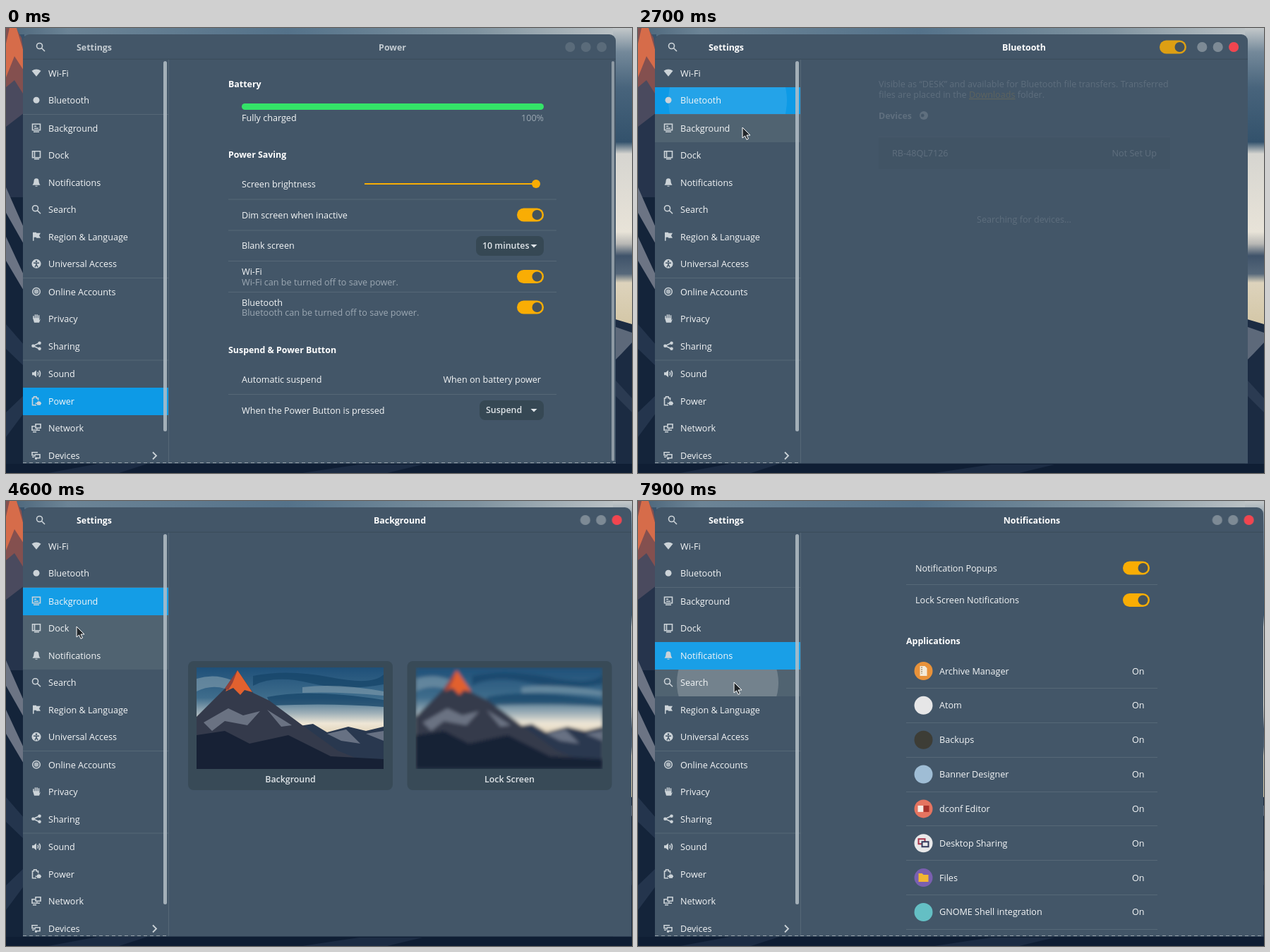
Animation, 887 px wide and 631 px high, one loop 8000 ms. Source, as an HTML page:

```html
<!DOCTYPE html>
<html lang="en">
<head>
<meta charset="utf-8">
<title>Settings</title>
<style>
html, body { margin: 0; width: 100%; height: 100%; overflow: hidden; background: #14243a; }
svg.stage { display: block; width: 100vw; height: 100vh; }
text { font: 400 12.6px "Open Sans", "Noto Sans", sans-serif; fill: #f4f6f7; white-space: pre; }
.bold { font-weight: 700; font-size: 12.4px; fill: #fff; }
.semi { font-weight: 600; font-size: 12.4px; fill: #dfe4e8; }
.muted { fill: #9ca8b3; }
.small { font-size: 11.2px; }
.dim { fill: #c3cbd1; }
.end { text-anchor: end; }
.mid { text-anchor: middle; }
.line { stroke: #566877; }
.dash { stroke: #98a3ac; stroke-dasharray: 5 4; }
.stroke { fill: none; stroke: #ccd3d8; stroke-width: 1.6; }
.solid { fill: #ccd3d8; }
.hidden { opacity: 0; }
</style>
</head>
<body>
<svg class="stage" viewBox="0 0 887 631" preserveAspectRatio="none"></svg>
<script>
const LOOP = 8000, BG = '#435668', DARK = '#364854', YELLOW = '#f9ad04';

// Drawing helpers: y is the vertical centre of a line of text.
const text = (x, y, s, cls = '') => `<text x="${x}" y="${y + 4.5}" class="${cls}">${s}</text>`;
const rect = (x, y, w, h, fill, r = 0, more = '') =>
  `<rect x="${x}" y="${y}" width="${w}" height="${h}" rx="${r}" fill="${fill}" ${more}/>`;
const dot = (x, y, r, fill, more = '') => `<circle cx="${x}" cy="${y}" r="${r}" fill="${fill}" ${more}/>`;
const path = (d, fill, more = '') => `<path d="${d}" fill="${fill}" ${more}/>`;
const hline = (x1, x2, y, cls = 'line') => `<path d="M${x1} ${y}H${x2}" class="${cls}"/>`;
const at = (x, y, body) => `<g transform="translate(${x} ${y})">${body}</g>`;
const group = (id, body, cls = '') => `<g id="${id}" class="${cls}">${body}</g>`;
const each = (list, fn) => list.map(fn).join('');
const toggle = (x, y, on = true) => rect(x, y - 9.5, 38, 19, on ? YELLOW : '#637280', 9.5)
  + dot(on ? x + 28.5 : x + 9.5, y, 7, on ? '#44525c' : DARK);
const dropdown = (x, right, y, label) => rect(x, y - 14, right - x, 28, DARK, 8)
  + text(x + 9, y - .5, label, 'semi') + path(`M${right - 18.5} ${y - 2}h9l-4.5 4.5z`, '#dfe4e8');
const icon = (s, f = '') => `<path d="${s}" class="stroke"/><path d="${f}" class="solid"/>`;
const grad = (id, stops, dir = 'x2="0" y2="1"') => `<linearGradient id="${id}" ${dir}>`
  + each(stops, ([o, c]) => `<stop offset="${o}" stop-color="${c}"/>`) + '</linearGradient>';

const searchIcon = icon('M2.5-1.5A4 4 0 1 1-5.5-1.5A4 4 0 1 1 2.5-1.5M1.5 1.5L6 6');
const rows = [
  ['Wi-Fi', icon('', 'M-6.5-3Q0-7.5 6.5-3L0 5Z')],
  ['Bluetooth', dot(0, 0, 4.5, '#ccd3d8')],
  ['Background', icon('M-5.5-5.5H5.5V3H-5.5ZM-4 5.5H4M-3 .5H3M-3-2.5H0')],
  ['Dock', icon('M-5.5-5.5H5.5V3.5H-5.5ZM-2.5-5.5V3.5M-3 5.5H4')],
  ['Notifications', icon('', 'M-5.5 4Q-3.5 2-3.5-1.5Q-3.5-5.5 0-5.5T3.5-1.5Q3.5 2 5.5 4ZM-1.5 5H1.5V6H-1.5Z')],
  ['Search', searchIcon],
  ['Region &amp; Language', icon('', 'M-5-6H0V-5H6L4-1.5 6 2H0V1H-3.5V6H-5Z')],
  ['Universal Access', dot(0, 0, 6.5, '#ccd3d8') + dot(0, -3.5, 1.3, BG)
    + path('M-4-1H4M0-1V2M-2 5L0 1 2 5', 'none', `stroke="${BG}" stroke-width="1.5"`)],
  ['Online Accounts', dot(0, 0, 5.3, 'none', 'stroke="#ccd3d8" stroke-width="1.5"') + dot(0, 0, 3.3, '#aab4bc')],
  ['Privacy', icon('M-4 0V-4M-1.5 0V-6M1 0V-6M3.5 0V-5', 'M-5-1H4.3V2L6 0 4 5.5H-3Z')],
  ['Sharing', icon('M5-4.5L-4.5 0 5 4.5') + dot(4.5, -4, 2.3, '#ccd3d8') + dot(-4.5, 0, 2.3, '#ccd3d8') + dot(4.5, 4, 2.3, '#ccd3d8')],
  ['Sound', icon('M2-2.5Q3.5 0 2 2.5M4-4.5Q7 0 4 4.5', 'M-6-2H-3.5L0-5V5L-3.5 2H-6Z')],
  ['Power', icon('M0 6H-5.5V-4H-3.5V-6H0V-4H2.5V-1M-1.5 3.5H1', 'M1 1H3V0H4V1H6V2.5H7V4.5H6V6H1Z')],
  ['Network', icon('M-1-5.5H6V0H-1ZM-2-2.5H-6V3H1V1M-5 5.5H0M2 3H5')],
  ['Devices', icon('M2-4H-6V0H-3M-2-1H5V4H1M-2-1V2M-6 2.5H-3', 'M-2 3H1V6H-2Z')]
];
const rowTop = i => 45 + 38.5 * i + (i >= 2) + (i >= 8) + (i >= 11);

const sidebar = each(rows, ([label, mark], i) => {
  const top = rowTop(i), mid = top + 19.25;
  return `<svg x="24" y="${top}" width="206" height="38.5">`
    + rect(0, 0, 206, 39, '#7e9490', 0, `id="hover${i}" class="hidden" fill-opacity=".22"`)
    + rect(0, 0, 206, 39, '#0d9ae6', 0, `id="pick${i}" class="hidden"`)
    + dot(103, 19.25, 0, '#fff', `id="ripple${i}" class="hidden"`) + '</svg>'
    + at(43, mid - .5, mark) + text(60, mid, label);
}) + each([2, 8, 11], i => hline(24, 230, rowTop(i) - .5))
  + path('M208 601.5l5 5-5 5', 'none', 'stroke="#ccd3d8" stroke-width="1.8"')
  + path('M230.5 45V617', 'none', 'class="line"') + hline(24, 230, 616.5, 'dash')
  + rect(223, 47, 5, 525, '#b4bfc7', 2.5, 'id="scrollbar" fill-opacity=".85"');

const pageDash = right => hline(230, right, 616.5, 'dash');

const power = text(315, 79.5, 'Battery', 'bold') + rect(334, 107, 428, 9, '#34e468', 4.5)
  + text(334, 127, 'Fully charged') + text(762, 127, '100%', 'muted end')
  + text(315, 179, 'Power Saving', 'bold') + text(334, 221, 'Screen brightness')
  + rect(508, 220, 243, 2, YELLOW) + dot(751, 221, 6, YELLOW)
  + text(334, 265, 'Dim screen when inactive') + toggle(724, 265)
  + text(334, 308.5, 'Blank screen') + dropdown(666, 762, 309, '10 minutes')
  + each([['Wi-Fi', 345.5], ['Bluetooth', 389]], ([name, y]) => text(334, y, name)
    + text(334, y + 14.5, name + ' can be turned off to save power.', 'muted') + toggle(724, y + 7))
  + text(315, 456, 'Suspend &amp; Power Button', 'bold')
  + text(334, 498, 'Automatic suspend') + text(758, 498, 'When on battery power', 'end')
  + text(334, 542, 'When the Power Button is pressed') + dropdown(671, 762, 542, 'Suspend')
  + each([243, 287, 330.5, 374.5, 519.5], y => hline(315, 780, y))
  + rect(858, 47, 4, 567, '#8e9aa4', 2) + pageDash(864);

const gear = dot(0, 0, 14, DARK) + dot(0, 0, 3.6, 'none', 'stroke="#dfe4e8" stroke-width="2.8"')
  + dot(0, 0, 5.4, 'none', 'stroke="#dfe4e8" stroke-width="2" stroke-dasharray="2.12"');
const lock = rect(-5, -1, 10, 7, '#f4f6f7', 1) + path('M-3-1V-3A3 3 0 0 1 3-3V-1', 'none', 'stroke="#f4f6f7" stroke-width="1.6"');
const signal = path('M-6.5-2.5Q0-7.5 6.5-2.5L0 5Z', '#8a98a4') + path('M-5-1Q0-4.5 5-1L0 5Z', '#f4f6f7');
const networks = ['REDNOR_2G_K4bT', 'LUMOVARE_3AF7', 'SillyMoonPatio', 'Piso', 'wifi piso.', 'WLAN_6B2D',
  'Piso5', 'REDNOR_5G_K4bT', 'LUMOVARE_MAXI_4837', 'WLAN5QR_D7C1', 'LUMOVARE_BE92'];
const wifi = text(360, 92.5, 'Airplane Mode', 'bold')
  + text(360, 108.5, 'Disables Wi-Fi, Bluetooth and mobile broadband', 'muted small') + toggle(698, 99, false)
  + text(342, 163, 'Visible Networks', 'bold')
  + each(networks, (name, i) => {
    const y = 200.5 + 39.4 * i;
    return text(355, y, name) + (i % 3 || i > 6 ? '' : at(681, y - .5, gear))
      + at(715, y - 1, lock) + at(734, y, signal) + hline(343, 753, Math.round(y + 19) + .5);
  }) + path('M402.5 437l3 3 6-6.5', 'none', 'stroke="#fff" stroke-width="2.4"') + pageDash(864);

const device = (y, name, state, cls = '') => text(360, y, name, cls) + text(735, y, state, cls + ' end');
const devices = [['IoT', 'Disconnected'], ['K-T-2014-09-17', 'Not Set Up'], ['RB-48QL7126', 'Not Set Up'], ['Unknown', 'Not Set Up', 'muted']];
const bluetooth = text(341, 79.5, 'Visible as “DESK” and available for Bluetooth file transfers. Transferred')
  + text(341, 94.5, `files are placed in the <tspan fill="#f0b030" text-decoration="underline">Downloads</tspan> folder.`)
  + text(341, 124, 'Devices', 'bold') + dot(405, 124, 6, '#fff')
  + group('spin', dot(406.3, 125.3, 2.4, BG)) 
  + group('scan', rect(341, 155, 413, 45, '#3b4b5a') + hline(341, 754, 154.5) + device(177, 'RB-48QL7126', 'Not Set Up')
    + text(547, 271, 'Searching for devices…', 'mid'))
  + each(devices, ([name, state, cls], i) => group('device' + i, device(165 + 46.4 * i, name, state, cls)
    + (i ? hline(341, 754, Math.round(142 + 46.4 * i) - .5 + (i > 1)) : ''), 'hidden'));

const mountain = rect(0, 0, 265, 144, 'url(#sky)')
  + path('M80 12Q130 2 190 14T265 10V24Q210 34 160 22T80 26ZM100 42Q160 30 265 46V56Q190 50 105 54Z', '#164468', 'opacity=".75"')
  + path('M0 16Q25 8 50 18L40 30Q20 24 0 34ZM150 28Q200 22 265 34V40Q200 34 150 36Z', '#7896a8', 'opacity=".7"')
  + path('M140 84L165 80 185 92 215 84 240 90 265 84V144H140Z', '#29384f')
  + path('M0 70L25 45 40 30 58 4 80 36 103 47 150 82 200 118 265 144H0Z', '#343a4b')
  + path('M58 4L79 35 68 32 62 39 52 29 41 34Z', '#e2612f') + path('M58 4L51 22 45 32 40 30Z', '#93413a')
  + path('M10 78L45 58 66 68 90 62 72 82 40 76 22 90ZM100 60L135 82 120 84ZM185 94L212 88 232 108 205 104ZM240 94L265 90V104Z', '#7d8494', 'opacity=".75"')
  + path('M0 96L40 90 75 108 130 96 190 126 265 130V144H0Z', '#172135');
const card = (x, label, blur) => rect(x, 227, 290, 183, '#384a57', 8)
  + `<svg x="${x + 12}" y="236" width="265" height="144"><g ${blur}>${mountain}</g></svg>`
  + text(x + 145, 394, label, 'semi mid');
const background = card(258, 'Background', '') + card(568.5, 'Lock Screen', 'filter="url(#blur)"');

const dock = text(348, 91.5, 'Auto-hide the Dock')
  + text(348, 107.5, 'The dock hides when any windows overlap with it.', 'muted small') + toggle(732, 99, false)
  + text(348, 148, 'Icon size') + text(557, 148, '54', 'muted end')
  + rect(719, 147, 40, 2, '#74828f') + rect(567, 147, 152, 2, YELLOW)
  + dot(718.5, 147.5, 6, YELLOW) + path('M713.5 150h10l-5 6z', YELLOW) + path('M695.5 155V163', 'none', 'stroke="#82909b"')
  + text(348, 194.5, 'Show on') + dropdown(651, 769.5, 194, 'Built-in display')
  + text(348, 240.5, 'Position on screen') + dropdown(693, 769.5, 240, 'Bottom')
  + each([124.5, 170.5, 217.5], y => hline(330, 788, y));

const apps = [
  ['Archive Manager', '#e8923a', path('M-5-7H2L5-4V7H-5Z', '#f3ead9') + path('M-2.5-6V4', 'none', 'stroke="#b9a88c" stroke-width="2" stroke-dasharray="2 1"')],
  ['Atom', '#e6e6e7', ''], ['Backups', '#3d3d36', ''], ['Banner Designer', '#9fbdd5', ''],
  ['dconf Editor', '#e57460', rect(-8, -4.5, 8, 9, '#f5ece6') + rect(0, -4.5, 8, 9, '#a8322c')],
  ['Desktop Sharing', '#e9e9ea', path('M-7-6H2V1H-7Z', 'none', 'stroke="#a83248" stroke-width="2"') + rect(-2, -2, 9, 7, '#e9e9ea', 0, 'stroke="#333a5c" stroke-width="2"')],
  ['Files', '#7a5fb0', path('M-7-6H-2L0-4H7V6H-7Z', '#f2b632')],
  ['GNOME Shell integration', '#64bfc4', '']
];
const notifications = text(393, 95, 'Notification Popups') + toggle(687, 95) + hline(380, 736, 118.5)
  + text(393, 140.5, 'Lock Screen Notifications') + toggle(687, 140.5)
  + text(380, 198.5, 'Applications', 'bold')
  + each(apps, ([name, color, mark], i) => {
    const y = 241 + 48.85 * i;
    return dot(404.5, y, 13, color) + at(404.5, y, mark) + text(427, y, name) + text(700, y, 'On')
      + hline(380, 736, Math.round(y + 24) + .5);
  }) + pageDash(886);

const title = (x, name) => text(x, 27, name, 'bold mid');
const heads = {
  power: text(100, 27, 'Settings', 'bold dim') + text(547.5, 27, 'Power', 'bold mid dim'),
  wifi: text(547.5, 22.5, 'Wi-Fi', 'bold mid') + text(547.5, 34, 'Connected', 'small mid dim') + toggle(710, 27)
    + path('M762.5 23.5h9M762.5 27h9M762.5 30.5h9', 'none', 'stroke="#f4f6f7" stroke-width="1.6"'),
  bluetooth: title(547, 'Bluetooth') + group('btSwitch', toggle(739, 27)),
  background: title(558, 'Background'), dock: title(558, 'Dock'), notifications: title(558, 'Notifications')
};
const pages = { power, wifi, bluetooth, background, dock, notifications };

const controls = colors => each(colors, (c, i) => dot(799.3 + 22.4 * i, 27, 7, c));
const wallpaper = rect(0, 0, 887, 631, '#14243a')
  + rect(0, 0, 887, 12, 'url(#top)') + rect(860, 0, 27, 425, 'url(#side)')
  + path('M860 412L887 420V631H860Z', '#1b2b42') + path('M864 424L887 432V446L872 462 864 470Z', '#5d697a')
  + path('M864 500L887 525V545L864 522Z', '#2b3b52')
  + rect(0, 9, 26, 110, '#39536c') + path('M0 0H14L22 14 26 40V110H0Z', '#84504f')
  + path('M5 0H15L25 34V60L12 40 0 70V22Z', '#d66c4a') + path('M0 84L12 74 26 96V150H0Z', '#4a4a5e')
  + path('M0 140L26 120V240H0Z', '#26344c') + path('M0 226L26 285V308L0 262ZM0 296L26 352V374L0 330Z', '#6c7484')
  + path('M0 420L26 450V480L0 455ZM0 545L26 520V545L0 580Z', '#24354d')
  + path('M0 618H887V631H0Z', '#0f1e34') + path('M60 631L130 618H200L160 631ZM420 631L500 619H590L540 631Z', '#1c2c44');

document.querySelector('svg').innerHTML = '<defs>'
  + grad('sky', [[0, '#1f5079'], [.3, '#3f6d8c'], [.45, '#9fb0b8'], [.55, '#eee6d6'], [.65, '#e3d5ba']])
  + grad('side', [[0, '#c3c8ca'], [.08, '#74899a'], [.2, '#48647c'], [.38, '#33526c'], [.42, '#d6d5d0'], [.68, '#e8e3d8'], [.72, '#b8b8b5'], [.76, '#3f536a'], [.82, '#56687a'], [.85, '#ddd3bc'], [1, '#d3c6a5']])
  + grad('top', [[0, '#4a6479'], [.1, '#6c8496'], [.45, '#54728a'], [.75, '#7e929f'], [1, '#c3c8ca']], '')
  + '<filter id="blur"><feGaussianBlur stdDeviation="2.5"/></filter></defs>'
  + wallpaper
  + rect(24, 9, 840, 620, BG, 9, 'id="frame" style="clip-path:inset(0 0 11.5px 0)"')
  + rect(24, 43.5, 840, 1.5, '#3c4e5e', 0, 'id="headLine"')
  + at(49, 27, searchIcon) + sidebar
  + each(Object.keys(pages), id => group(id, pages[id], 'hidden') + group(id + 'Head', heads[id], 'hidden'))
  + group('controls', controls(['#5a6b7a', '#5a6b7a', '#5a6b7a'])
    + group('focus', controls(['#7d8a95', '#7d8a95', '#f2454f']), 'hidden'))
  + group('settings', text(100, 27, 'Settings', 'bold'), 'hidden')
  + group('cursor', path('M0 0V15L3.5 12 6 17.3 8.5 16 6 11H11Z', '#22272b', 'stroke="#fff"'), 'hidden');

// Animate one property over the loop in 100 ms ticks; keys are [ms, value].
function track(id, prop, keys) {
  keys = keys.filter(([t]) => t >= 0 && t <= LOOP);
  const all = [[0, keys[0][1]], ...keys, [LOOP, keys[keys.length - 1][1]]];
  document.getElementById(id).animate(all.map(([t, v], i) => ({
    offset: t / LOOP, [prop]: v,
    easing: `steps(${Math.max(1, Math.round(((all[i + 1] || [t])[0] - t) / 100))})`
  })), { duration: LOOP, iterations: Infinity });
}
// Visible between two times; a length of 100 ms means a hard change.
const show = (id, from, to, rise = 100, fall = 100) =>
  track(id, 'opacity', [[from - 100, 0], [from - 100 + rise, 1], [to - 100, 1], [to - 100 + fall, 0]]);

// Page, sidebar row, selected from, selected until
[['power', 12, 0, 1200], ['wifi', 0, 1200, 2500], ['bluetooth', 1, 2500, 3800], ['background', 2, 3800, 5900],
  ['dock', 3, 5900, 7500], ['notifications', 4, 7500, LOOP]].forEach(([id, row, from, to]) => {
  show('pick' + row, from, to);
  show(id + 'Head', from, to);
  if (id === 'bluetooth') track(id, 'opacity', [[2600, 0], [2700, .15], [2900, 1], [3700, 1], [3800, 0]]);
  else show(id, from, to, from ? 300 : 100);
});

// Row, press time, growth per tick
[[0, 1100], [1, 2400], [2, 3500], [3, 5600], [4, 7300], [5, 7600, 24]].forEach(([row, t, rate = 28]) => {
  track('ripple' + row, 'r', [[t, '0px'], [t + 400, rate * 4 + 'px']]);
  const held = row === 5 ? 300 : 200;
  track('ripple' + row, 'opacity', [[t, 0], [t + 100, .2], [t + held, .2], [t + held + 100, .1], [t + held + 250, .05], [t + 1100, .03], [t + 1200, 0]]);
});

[[1, 900, 1000], [0, 1000, 1200], [2, 1400, 2000], [1, 2100, 2500], [2, 2600, 3800], [3, 4100, 5900],
  [4, 4200, 4700], [4, 7000, 7500], [5, 7600, LOOP]].reduce((spans, [row, from, to]) => {
  (spans[row] ||= []).push([from - 100, 0], [from, 1], [to - 100, 1], [to, 0]);
  return spans;
}, []).forEach((keys, row) => track('hover' + row, 'opacity', keys));

show('focus', 1200, LOOP);
show('settings', 1200, LOOP);
show('scan', 0, 3000);
[3000, 3000, 3200, 3400].forEach((t, i) => show('device' + i, t, LOOP));
track('btSwitch', 'opacity', [[2500, .5], [2700, .85], [2800, 1]]);
track('scrollbar', 'opacity', [[1200, 1], [1300, .65], [1500, .65], [1700, 1], [6000, 1], [6300, .18], [6800, .18], [7000, 1]]);
document.getElementById('spin').style.transformOrigin = '405px 124px';
track('spin', 'transform', [[0, 'rotate(0deg)'], [LOOP, 'rotate(3600deg)']]);
track('frame', 'width', [[3700, '840px'], [3800, '862px']]);
track('headLine', 'width', [[3700, '840px'], [3800, '862px']]);
track('controls', 'transform', [[3700, 'translate(0px)'], [3800, 'translate(21.5px)']]);

show('cursor', 100, LOOP);
track('cursor', 'transform', [
  [100, 880, 600], [500, 520, 330], [900, 176, 101], [1000, 62, 72], [1200, 62, 72], [1500, 105, 125],
  [1900, 120, 112], [2100, 120, 112], [2500, 128, 104], [2700, 148, 141], [2900, 160, 140], [3400, 178, 138],
  [3600, 192, 136], [3700, 195, 134], [4000, 190, 150], [4300, 115, 215], [4600, 100, 178], [5300, 108, 168],
  [5700, 116, 186], [5900, 116, 186], [6300, 119, 182], [6700, 121, 184], [7200, 128, 215], [7400, 128, 215], [7700, 136, 257]
].map(([t, x, y]) => [t, `translate(${x}px, ${y}px)`]));
</script>
</body>
</html>
```
